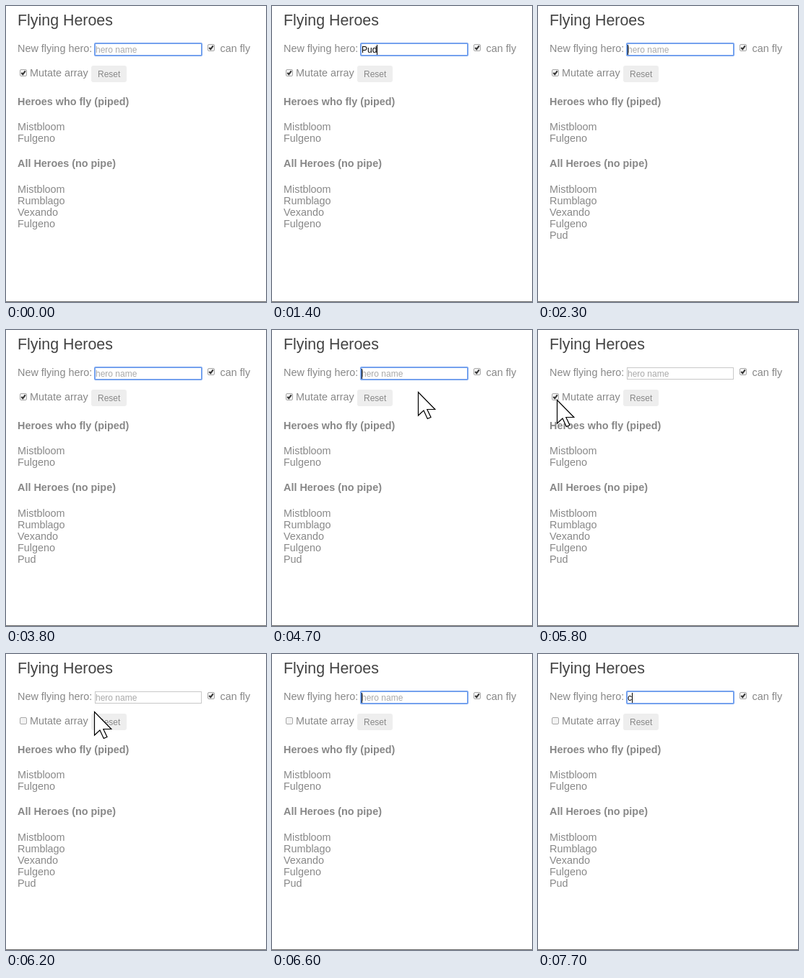
An HTML page that plays this animation: 360x412 px, repeating every 8000 ms.

```html
<!DOCTYPE html>
<html lang="en">
<head>
<meta charset="utf-8">
<title>Flying Heroes</title>
<style>
  html, body { margin: 0; width: 100%; height: 100%; overflow: hidden; background: #fff; }
  svg { display: block; font: 14.4px "Liberation Sans", Arial, sans-serif; fill: #888; }
  .title { font-size: 21.4px; fill: #444; }
  .bold { font-weight: bold; }
  .small { font-size: 12px; }
  .placeholder { fill: #a9a9a9; }
  .typed { fill: #000; }
  .box { fill: #f3f3f3; stroke: #a8a8a8; }
  .tick { fill: none; stroke: #333; stroke-width: 2; }
  .field { fill: #fff; stroke: #c8c8c8; }
  .ring { fill: none; stroke: #74a1ee; stroke-width: 2; }
</style>
</head>
<body>
<svg width="360" height="412" viewBox="0 0 360 412">
  <defs>
    <g id="checkbox">
      <rect class="box" x=".5" y=".5" width="9" height="9" rx="1.5"/>
    </g>
    <path id="check" class="tick" d="M2.3 5l2 2.2L7.8 2.3"/>
    <path id="beamShape" d="M-7.5 -15h4.5q2 0 3 1.5q1 -1.5 3 -1.5h4.5M0 -14V14M-7.5 15h4.5q2 0 3 -1.5q1 1.5 3 1.5h4.5"/>
  </defs>
  <text class="title" x="16" y="27">Flying Heroes</text>
  <text x="16" y="64">New flying hero:</text>
  <rect class="field" x="123.5" y="52.5" width="147" height="16"/>
  <rect id="ring" class="ring" x="123" y="52" width="148" height="17" rx="1"/>
  <text id="placeholder" class="small placeholder" x="124" y="65">hero name</text>
  <text id="typed" class="small typed" x="124" y="65"></text>
  <rect id="caret" y="54" width="1" height="14" fill="#000"/>
  <use href="#checkbox" x="279" y="53"/>
  <use href="#check" x="279" y="53"/>
  <text x="296.5" y="64">can fly</text>
  <use href="#checkbox" x="19" y="88"/>
  <use id="mutateTick" href="#check" x="19" y="88"/>
  <text x="33" y="98">Mutate array</text>
  <rect x="118" y="83" width="49" height="23" rx="3" fill="#eee"/>
  <text class="small" x="127" y="99">Reset</text>
  <text class="bold" x="16" y="138">Heroes who fly (piped)</text>
  <text class="bold" x="16" y="224">All Heroes (no pipe)</text>
  <g id="heroes"></g>
  <rect y="411" width="360" height="1" fill="#666"/>
  <path id="arrow" d="M.5 .5V33L8 26L13.3 37.5L18 35.5L12.8 24.5H23.8Z" fill="#fff" stroke="#000" stroke-width="1.2"/>
  <g id="beam" fill="none">
    <use href="#beamShape" y="-5" stroke="#fff" stroke-width="5"/>
    <use href="#beamShape" y="-5" stroke="#000" stroke-width="3"/>
  </g>
</svg>
<script>
const DURATION = 8000, STEP = 100, BLINK = 515;
const LINE_HEIGHT = 16, NEW_HERO = 'Pud';
const el = id => document.getElementById(id);
const show = (id, visible) => el(id).setAttribute('visibility', visible ? 'visible' : 'hidden');

function addHeroes(names, y) {
  names.forEach((name, i) => el('heroes').insertAdjacentHTML('beforeend',
    `<text x="16" y="${y + i * LINE_HEIGHT}">${name}</text>`));
}
addHeroes(['Mistbloom', 'Fulgeno'], 173);
addHeroes(['Mistbloom', 'Rumblago', 'Vexando', 'Fulgeno', NEW_HERO], 260);
el('heroes').lastElementChild.id = 'added';

// Each event changes the field's text or focus and restarts the caret's blinking.
const events = [
  { at: -100 - BLINK, text: '' },
  { at: 1150, text: NEW_HERO[0] },
  { at: 1350, text: NEW_HERO },
  { at: 2250, text: '', submit: true },
  { at: 5450, text: '', blurred: true },
  { at: 6550, text: '' },
  { at: 7650, text: 'c' },
];
const submitTime = events.find(e => e.submit).at, uncheckTime = 5850;

const start = { x: 288, y: 80 }, checkbox = { x: 26, y: 97 };
const field = { x: 174, y: 70 }, exit = { x: 231, y: 81 };
const easeOut = p => 1 - (1 - p) ** 3;
const smooth = p => p * p * (3 - 2 * p);
const moves = [
  { from: start, to: checkbox, begin: 4600, end: 5400, until: 5900, ease: easeOut },
  { from: checkbox, to: field, begin: 5900, end: 6400, until: 6600, ease: smooth },
  { from: field, to: exit, begin: 6700, end: 6800, until: 6900, ease: smooth },
];

function pointerAt(t) {
  const move = moves.find(m => t >= m.begin && t < m.until);
  if (!move) return null;
  const { from, to, begin, end, ease } = move;
  const k = ease(Math.min(1, (t - begin) / (end - begin)));
  return { x: from.x + (to.x - from.x) * k, y: from.y + (to.y - from.y) * k };
}

function isOverText({ x, y }) {
  const overLabel = x > 33 && x < 114 && y > 86;
  const overField = x > 123 && x < 271 && y < 72;
  return overLabel || overField;
}

function draw(t) {
  const { at, text, blurred } = events.findLast(e => t >= e.at);
  el('typed').textContent = text;
  show('placeholder', !text);
  show('ring', !blurred);
  el('caret').setAttribute('x', text ? Math.round(123.5 + el('typed').getComputedTextLength()) : 124);
  show('caret', !blurred && (t - at) % (2 * BLINK) < BLINK);
  show('added', t >= submitTime);
  show('mutateTick', t < uncheckTime);

  const pointer = pointerAt(t), overText = pointer && isOverText(pointer);
  show('arrow', pointer && !overText);
  show('beam', overText);
  if (pointer) {
    for (const id of ['arrow', 'beam']) {
      el(id).setAttribute('transform', `translate(${Math.round(pointer.x)} ${Math.round(pointer.y)})`);
    }
  }
}

const startTime = performance.now();
function tick() {
  const t = (performance.now() - startTime) % DURATION;
  draw(Math.floor(t / STEP) * STEP);
  requestAnimationFrame(tick);
}
tick();
</script>
</body>
</html>
```
